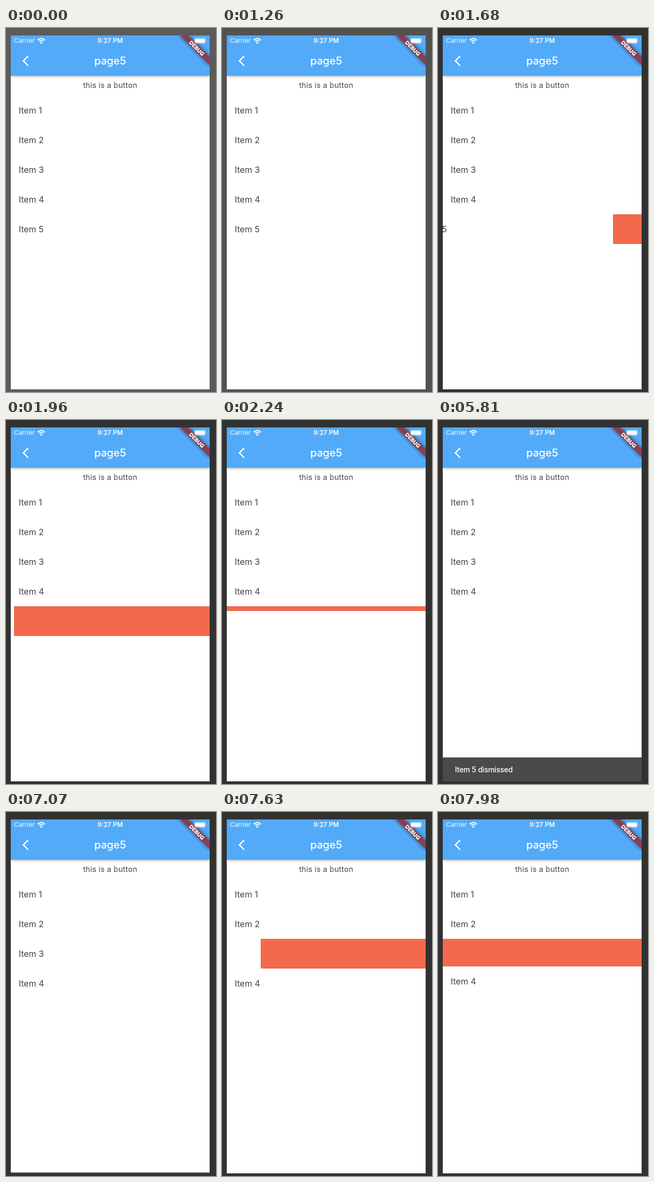
An HTML page for the animation above (8 s loop, 396 by 686 pixels).

```html
<!DOCTYPE html>
<html lang="en">
<head>
<meta charset="utf-8">
<title>Swipe to dismiss</title>
<style>
  html, body { margin: 0; width: 100%; height: 100%; overflow: hidden; }
  body {
    background: #323232;
    font-family: Inter, Roboto, sans-serif;
    color: #424242;
    animation: backdrop 8s linear infinite;
  }
  .phone {
    position: absolute; left: 9px; top: 14px;
    width: 375px; height: 667px;
    background: #fff; overflow: hidden;
  }
  .bar {
    position: absolute; inset: 0 0 auto; height: 76px;
    background: #52aaf9; color: #fff;
    box-shadow: 0 2px 4px rgba(0, 0, 0, .26);
  }
  .bar span { position: absolute; white-space: nowrap; }
  .carrier { left: 6px; top: 0; font-size: 12px; line-height: 20px; }
  .clock { left: 0; right: 0; top: 0; text-align: center; font-size: 12px; font-weight: 600; line-height: 20px; }
  .title { left: 0; right: 0; top: 20px; text-align: center; font-size: 20px; font-weight: 500; line-height: 56px; }
  .icons { position: absolute; inset: 0; }

  .button {
    position: absolute; left: 0; right: 0; top: 76px;
    text-align: center; font-size: 14px; letter-spacing: .35px; line-height: 36px;
  }
  .list { position: absolute; left: 0; right: 0; top: 113px; }
  .row { height: 56px; overflow: hidden; background: #f4694c; }
  .item { height: 56px; padding-left: 15px; background: #fff; font-size: 16px; line-height: 56px; }
  .third { animation: shrink3 8s linear infinite; }
  .third .item { animation: slide3 8s linear infinite; }
  .fifth { animation: shrink5 8s linear infinite; }
  .fifth .item { animation: slide5 8s linear infinite; }

  .snack {
    position: absolute; left: 0; right: 0; bottom: 0; height: 45px;
    background: #4a4a4a; color: #fff;
    animation: snack 8s linear infinite;
  }
  .snack span {
    display: block; padding-left: 23px;
    font-size: 14px; font-weight: 500; letter-spacing: -.25px; line-height: 45px;
    animation: fade 8s linear infinite;
  }

  .banner { position: absolute; left: 375px; top: 0; transform: rotate(45deg); transform-origin: 0 0; }
  .banner div { position: absolute; left: -40px; top: 28px; width: 80px; height: 12px; }
  .shade { background: rgba(0, 0, 0, .5); filter: blur(3.5px); }
  .label {
    background: rgba(183, 46, 46, .627); color: #fff; text-align: center;
    font-size: 10.2px; font-weight: 900; line-height: 12px;
    text-shadow: 0 0 2px rgba(0, 0, 0, .3);
  }

  @keyframes backdrop {
    0%, 15.3% { background: #5b5b5b; }
    17.5%, 100% { background: #323232; }
  }
  @keyframes slide5 {
    0%, 19% { transform: none; }
    19.25% { transform: translateX(-4px); }
    20.125% { transform: translateX(-24px); }
    21% { transform: translateX(-53px); }
    21.875% { transform: translateX(-130px); }
    22.75% { transform: translateX(-280px); }
    23.625% { transform: translateX(-348px); }
    24.5% { transform: translateX(-369px); }
    25.375%, 100% { transform: translateX(-390px); }
  }
  @keyframes shrink5 {
    0% { height: 56px; }
    26.79% { height: 56px; animation-timing-function: ease; }
    29.04%, 100% { height: 0; }
  }
  @keyframes slide3 {
    0%, 90.6% { transform: none; }
    91% { transform: translateX(-4px); }
    91.875% { transform: translateX(-20px); }
    92.75% { transform: translateX(-48px); }
    93.625% { transform: translateX(-100px); }
    94.5% { transform: translateX(-200px); }
    95.375% { transform: translateX(-310px); }
    96.25% { transform: translateX(-357px); }
    97.125% { transform: translateX(-371px); }
    97.9%, 100% { transform: translateX(-390px); }
  }
  @keyframes shrink3 {
    0%, 99.575% { height: 56px; }
    99.75% { height: 52.5px; }
    100% { height: 41px; }
  }
  @keyframes snack {
    0% { transform: translateY(45px); box-shadow: 0 0 0 transparent; }
    29.31% {
      transform: translateY(45px); box-shadow: 0 0 0 transparent;
      animation-timing-function: cubic-bezier(.4, 0, .2, 1);
    }
    32.44% { transform: none; box-shadow: 0 0 3px rgba(0, 0, 0, .2); }
    85.64% {
      transform: none; box-shadow: 0 0 3px rgba(0, 0, 0, .2);
      animation-timing-function: cubic-bezier(.8, 0, .6, 1);
    }
    88.76%, 100% { transform: translateY(45px); box-shadow: 0 0 0 transparent; }
  }
  @keyframes fade {
    0%, 31.56% { opacity: 0; }
    32.44%, 85.64% { opacity: 1; }
    86.515%, 100% { opacity: 0; }
  }
</style>
</head>
<body>
<div class="phone">
  <div class="button">this is a button</div>
  <div class="list">
    <div class="row"><div class="item">Item 1</div></div>
    <div class="row"><div class="item">Item 2</div></div>
    <div class="row third"><div class="item">Item 3</div></div>
    <div class="row"><div class="item">Item 4</div></div>
    <div class="row fifth"><div class="item">Item 5</div></div>
  </div>
  <div class="bar">
    <span class="carrier">Carrier</span>
    <span class="clock">9:27 PM</span>
    <span class="title">page5</span>
  </div>
  <div class="snack"><span>Item 5 dismissed</span></div>
  <div class="banner"><div class="shade"></div><div class="label">DEBUG</div></div>
  <svg class="icons" width="375" height="76" fill="#fff">
    <path transform="translate(22 36)" d="M11.67 3.87 9.9 2.1 0 12l9.9 9.9 1.77-1.77L3.54 12z"/>
    <g fill="none" stroke="#fff" stroke-width="2">
      <path d="M50.7 8.7a9.6 9.6 0 0 1 13.6 0"/>
      <path d="M53.3 11.4a6 6 0 0 1 8.4 0"/>
    </g>
    <path d="M57.5 16.2 55.1 13.6a3.5 3.5 0 0 1 4.8 0z"/>
    <rect x="345.5" y="4.5" width="22" height="11" rx="2.8" fill="none" stroke="#fff" stroke-opacity=".4"/>
    <rect x="347" y="6" width="19" height="8" rx="1.5"/>
    <path d="M369.2 8v4a2.3 2.3 0 0 0 0-4z" fill-opacity=".45"/>
  </svg>
</div>
</body>
</html>
```
